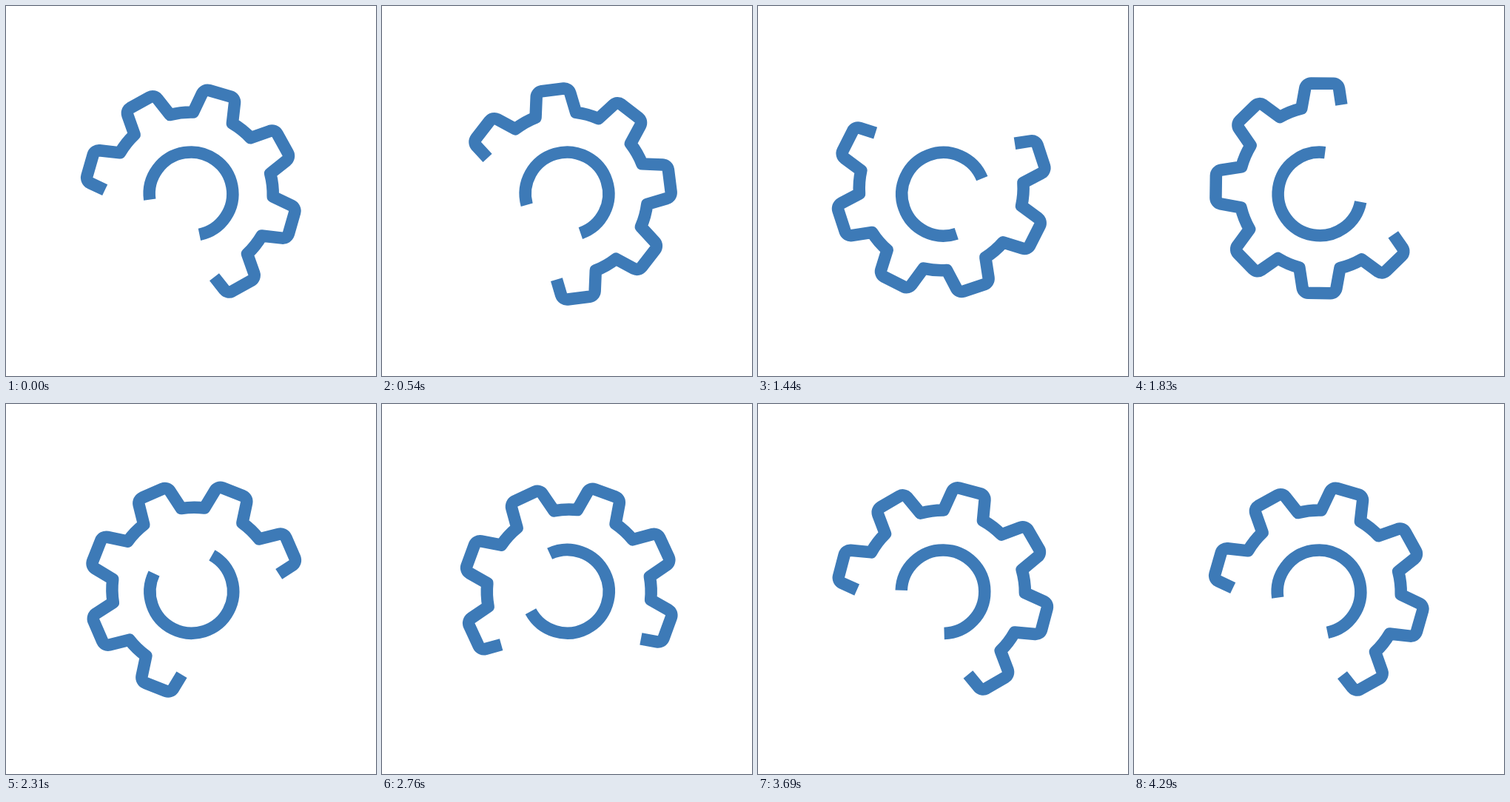
An HTML page that plays this animation: 500x500 px, repeating every 4.71 s.

```html
<!DOCTYPE html>
<html lang="en">
<head>
<meta charset="utf-8">
<title>Turning gear</title>
<style>
  html, body { margin: 0; height: 100%; overflow: hidden; background: #fff; }
  svg { display: block; width: 100%; height: 100%; }
  path { fill: none; stroke: #3d7ab7; stroke-width: 16.5; stroke-linejoin: round; }
</style>
</head>
<body>
<svg viewBox="0 0 500 500"><path id="gear"/><path id="ring"/></svg>
<script>
const LOOP = 4710, STEP = 30;
const gear = document.getElementById('gear');
const ring = document.getElementById('ring');

// Point at (radial, tangential) offset from a centre, turned by deg.
function place(cx, cy, deg, radial, tangent = 0) {
  const a = deg * Math.PI / 180, c = Math.cos(a), s = Math.sin(a);
  return (cx + radial * c - tangent * s).toFixed(2) + ' ' +
         (cy + radial * s + tangent * c).toFixed(2);
}

// Six of eight teeth, open at both ends.
function gearPath() {
  const first = 196, teeth = 6;
  let d = '';
  for (let i = 0; i < teeth; i++) {
    const at = (r, t) => place(249.8, 254.4, first + i * 45, r, t);
    d += i ? `A111 111 0 0 1 ${at(107.5, -27.5)}` : `M${at(113.2, -26.5)}`;
    d += `L${at(135, -22.9)}A8.25 8.25 0 0 1 ${at(141.7, -15)}`;
    d += `L${at(141.7, 15)}A8.25 8.25 0 0 1 ${at(135, 22.9)}`;
    d += 'L' + (i < teeth - 1 ? at(107.5, 27.5) : at(113.2, 26.5));
  }
  return d;
}

function ringPath() {
  const at = deg => place(250, 253.8, deg, 56.3);
  return `M${at(172)}A56.3 56.3 0 1 1 ${at(78.3)}`;
}

// Cubic Bezier easing with control points (a, 0) and (b, 1).
function ease(x, a, b) {
  if (x <= 0) return 0;
  if (x >= 1) return 1;
  let lo = 0, hi = 1, u;
  for (let i = 0; i < 30; i++) {
    u = (lo + hi) / 2;
    const v = 1 - u;
    if (3 * a * u * v * v + 3 * b * u * u * v + u ** 3 < x) lo = u; else hi = u;
  }
  return u * u * (3 - 2 * u);
}

function draw(now) {
  const t = Math.floor(now % LOOP / STEP) * STEP;
  const gearTurn = 360 * ease(t / 3900, 0.335, 0.456);
  const ringTurn = -360 * ease((t - 210) / 4080, 0.333, 0.472);
  gear.setAttribute('transform', `rotate(${gearTurn} 250 250)`);
  ring.setAttribute('transform', `rotate(${ringTurn} 250.5 253.8)`);
}

gear.setAttribute('d', gearPath());
ring.setAttribute('d', ringPath());
const start = performance.now();
function tick() {
  draw(performance.now() - start);
  requestAnimationFrame(tick);
}
tick();
</script>
</body>
</html>
```
